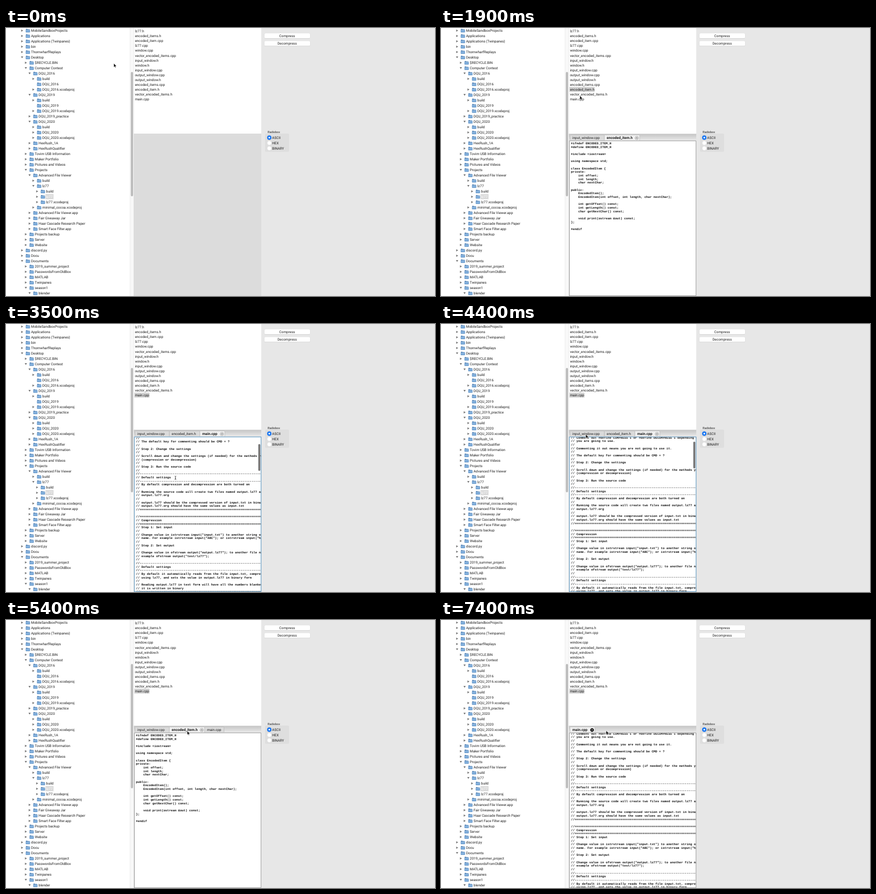
Write an HTML page that moves like this. It is 800 px wide and 500 px high and loops after 7500 ms.

```html
<!DOCTYPE html>
<html lang="en">
<head>
<meta charset="utf-8">
<title>File viewer</title>
<style>
  html, body { margin: 0; width: 100%; height: 100%; overflow: hidden; background: #e7e7e7; }
  svg { display: block; }
  text { font: 6.45px Roboto, sans-serif; fill: #1c1c1c; white-space: pre; text-rendering: geometricPrecision; }
  .code text { font: bold 5.715px "Liberation Mono", "Noto Sans CJK KR", monospace; fill: #111; }
  .code tspan { font-size: 5.3px; }
</style>
</head>
<body>
<svg id="stage" width="800" height="500" viewBox="0 0 800 500">
  <defs>
    <linearGradient id="bar" x2="0" y2="1">
      <stop stop-color="#c6c6c6"/><stop offset="1" stop-color="#ededed"/>
    </linearGradient>
    <linearGradient id="fold" x2="0" y2="1">
      <stop stop-color="#9cc3e8"/><stop offset="1" stop-color="#6a9ed2"/>
    </linearGradient>
    <clipPath id="view"><rect x="240" y="211.2" width="235.3" height="287.6"/></clipPath>
    <g id="folder">
      <path d="M.4-2.9h2.7l.8.8h3.5v5H.4z" fill="#5b88b8"/>
      <path d="M.3-1.2h7.5v3.9q0 .5-.5.5H.8q-.5 0-.5-.5z" fill="url(#fold)" stroke="#5585b8" stroke-width=".5"/>
    </g>
  </defs>
  <rect width="238" height="500" fill="#fff"/>
  <g id="tree"></g>
  <rect x="231" width="7" height="500" fill="#f8f8f8"/>
  <path d="M231.2 0V500" stroke="#e6e6e6" stroke-width=".6"/>
  <rect x="232.8" y="82" width="4.2" height="232" rx="2.1" fill="#bcbcbc"/>
  <rect x="238" width="238" height="500" fill="#dcdcdc"/>
  <rect x="238.5" width="237.5" height="197" fill="#fff"/>
  <rect id="picked" x="239.5" height="9.2" fill="#d2d2d2"/>
  <g id="files"></g>
  <g id="panel"></g>
  <g id="editor">
    <rect x="238.5" y="198" width="237.5" height="13" fill="url(#bar)"/>
    <g id="tabs"></g>
    <rect x="238.5" y="209.4" width="237.5" height="1.6" fill="#e2e2e2"/>
    <rect id="frame" x="239.4" y="210.7" width="236.2" height="288.6" fill="#fff"/>
    <g id="docs" clip-path="url(#view)"></g>
    <rect id="thumb" x="470.5" width="3.7" rx="1.8" fill="#747474"/>
  </g>
  <path id="arrow" d="M0 0V7.2L1.7 5.7 2.8 8.2 3.9 7.7 2.8 5.3H5.1z" fill="#000" stroke="#fff" stroke-width=".5"/>
  <path id="beam" d="M-1.5-3.2Q0-3.2 0-2.4Q0-3.2 1.5-3.2M0-2.4V2.4M-1.5 3.2Q0 3.2 0 2.4Q0 3.2 1.5 3.2M-.8 .8H.8" fill="none" stroke="#111" stroke-width=".7"/>
</svg>
<script>
const LOOP = 7500, STEP = 100, LINE = 6.667;
const el = id => document.getElementById(id);
const esc = s => s.replace(/&/g, '&amp;').replace(/</g, '&lt;');
const label = (x, y, s, extra = '') => `<text x="${x}" y="${y + 2.3}" ${extra}>${esc(s)}</text>`;
const show = (id, on) => el(id).setAttribute('display', on ? 'inline' : 'none');
const set = (id, attrs) => { for (const k in attrs) el(id).setAttribute(k, attrs[k]); };

// Depth, state (> closed, v open, - leaf), name
const tree = `0>MobileSandboxProjects
0>Applications
0>Applications (Twinpanes)
0>bin
0>ThornwharfReplays
0vDesktop
1>$RECYCLE.BIN
1vComputer Contest
2vDQU_2016
3>build
3-DQU_2016
3>DQU_2016.xcodeproj
2vDQU_2019
3>build
3-DQU_2019
3>DQU_2019.xcodeproj
2>DQU_2019_practice
2vDQU_2020
3>build
3>DQU_2020
3>DQU_2020.xcodeproj
2>HexRush_1A
2>HexRushQualifier
1>Tovim USB Information
1>Maker Portfolio
1>Pictures and Videos
1vProjects
2vAdvanced File Viewer
3>build
3vlz77
4>build
4>lz77
4>lz77.xcodeproj
3>minimal_cocoa.xcodeproj
2>Advanced File Viewer.app
2>Fair Giveaway Jar
2>Haar Cascade Research Paper
2>Smart Face Filter.app
1>Projects backup
1>Server
1>Website
0>discord.py
0>Docu
0vDocuments
1>2019_summer_project
1>PasswordsFromOldBox
1>MATLAB
1>Twinpanes
1vseason1
2vblender`.split('\n');

const files = `lz77.h encoded_items.h encoded_item.cpp lz77.cpp window.cpp vector_encoded_items.cpp
input_window.h window.h input_window.cpp output_window.cpp output_window.h encoded_items.cpp
encoded_item.h vector_encoded_items.h main.cpp`.split(/\s+/);

const slashes = '/'.repeat(2);

// Each line gets its slashes; = and - become rules, ~ a blank line
const remarks = text => text.split('\n').map(s =>
  s === '~' ? '' : /^[=-]$/.test(s) ? slashes + s.repeat(80) : slashes + ' ' + s).join('\n');

const docs = {
  input: { name: 'input_window.cpp', width: 64, active: 73, row: 8, pick: 52, thumb: 65.5, rate: .23, text:
`${slashes}#define DEBUG_MSG 1

#include <iostream>
#include <fstream>

using namespace std;

#include "input_window.h"

InputWindow::InputWindow(istream &in, int fileSize) : in(in) {
    this->fileSize = fileSize;
    fileNumCharsProcessed = 0;
    fileNumCharsRemained = fileSize;
    init(WINDOW_SIZE);
}

InputWindow::InputWindow(istream &in, int fileSize, int windowSize) : in(in) {
    this->fileSize = fileSize;
    fileNumCharsProcessed = 0;
    fileNumCharsRemained = fileSize;
    init(windowSize);
}

std::ifstream::pos_type InputWindow::getFileSize(const char* filename) {
    std::ifstream in(filename, std::ifstream::ate | std::ifstream::binary);
    return in.tellg();
}

void InputWindow::init(int windowSize) {
    this->windowSize = windowSize;
    buffSize = windowSize * 2 + 1;

    buff = new char[buffSize];
    head = 0;
    pointer = 0;
    tail = 0; ${slashes} char를 in으로부터 한개 빼서 넣을 자리.

    numChars = 0; ${slashes} numCharsProcessed + numCharsRemained
    numCharsProcessed = 0;
    numCharsRemained = 0;

    while (numChars < windowSize && appendNextChar()) {
        numChars++;
        numCharsRemained++;
    }
${slashes}    cout << "Window::Window(): numChars = " << numChars << endl;
${slashes}
}

InputWindow::~InputWindow() {
    delete[] buff;
}` },
  item: { name: 'encoded_item.h', width: 57, active: 66, row: 12, pick: 47, thumb: 0, rate: 0, text:
`#ifndef ENCODED_ITEM_H
#define ENCODED_ITEM_H

#include <iostream>

using namespace std;

class EncodedItem {
private:
    int offset;
    int length;
    char nextChar;

public:
    EncodedItem();
    EncodedItem(int offset, int length, char nextChar);

    int getOffset() const;
    int getLength() const;
    char getNextChar() const;

    void print(ostream &out) const;
};

#endif` },
  main: { name: 'main.cpp', width: 36, active: 46.5, row: 14, pick: 28, thumb: 50, rate: .176, text: remarks(
`=
How to use

Step 1: Choose setting

Comment out #define COMPRESS 1 or #define DECOMPRESS 1 depending on what
you are going to use.

Commenting it out means you are not going to use it.

The default key for commenting should be CMD + ?

Step 2: Change the settings

Scroll down and change the settings (if needed) for the methods you use
(compression or decompression)

Step 3: Run the source code

-
Default settings
-
By default compression and decompression are both turned on

Running the source code will create two files named output.lz77 and
output.lz77.org

output.lz77 should be the compressed version of input.txt in binary
output.lz77.org should have the same values as input.txt
=
~
=
Compression
=
Step 1: Set input

Change value in istrstream input("input.txt") to another string or
name. For example istrstream input("ABC"); or istrstream input("hi");

Step 2: Set output

Change value in ofstream output("output.lz77"); to another file name
example ofstream output("test/lz77");

-
Default settings
-
By default it automatically reads from the file input.txt, compresses
using lz77, and sets the value in output.lz77 in binary form

Reading output.lz77 in text form will have all the numbers blanked as
it is written in binary
=
~
=
Decompression`) }
};

// Start time, open tabs, active tab
const sessions = [
  [700, 'input', 'input'],
  [1500, 'input item', 'item'],
  [2300, 'input item main', 'main'],
  [4500, 'input item main', 'input'],
  [5400, 'input item main', 'item'],
  [6100, 'input main', 'main'],
  [6800, 'input main', 'input'],
  [7400, 'main', 'main']
];
const picks = [[600, 'input'], [1400, 'item'], [2200, 'main']];
const pointer = [
  [0, 201, 66], [300, 264, 78], [800, 264, 78], [1300, 262, 111], [1600, 262, 111],
  [2000, 258, 131.5], [2400, 258, 131.5], [2700, 316, 287], [4100, 316, 287], [4400, 270, 206],
  [4500, 270, 206], [4700, 303, 272], [5100, 303, 272], [5400, 338, 207], [5600, 338, 207],
  [5900, 364, 207.5], [6200, 364, 207.5], [6600, 270, 207], [6900, 270, 207], [7300, 308, 206.5]
];
const scrolls = {
  input: [[4700, 0], [4800, 26.67], [5000, 40]],
  item: [[0, 0]],
  main: [[2900, 0], [3200, 30], [3300, 30], [3500, 62.5], [3700, 75], [4000, 36.7]]
};

const latest = (list, t) => list.filter(e => e[0] <= t).pop();
const within = (t, ...spans) => spans.some(([a, b]) => t >= a && t < b);

function track(keys, t) {
  const next = keys.findIndex(k => k[0] > t);
  if (next < 0) return keys[keys.length - 1].slice(1);
  if (next === 0) return keys[0].slice(1);
  const a = keys[next - 1], b = keys[next], p = (t - a[0]) / (b[0] - a[0]);
  return a.slice(1).map((v, i) => v + (b[i + 1] - v) * p);
}

function closeMark(x, hot) {
  return `<g transform="translate(${x} 205.2)" stroke-width=".8" stroke="${hot ? '#fff' : '#555'}">
    <circle r="3" fill="${hot ? '#000' : '#f2f2f2'}" stroke="${hot ? '#000' : '#777'}" stroke-width=".6"/>
    <path d="M-1.3-1.3L1.3 1.3M1.3-1.3L-1.3 1.3"/></g>`;
}

function tabStrip(open, active, hot) {
  let x = 240.5;
  return open.split(' ').map(id => {
    const d = docs[id], on = id === active, w = on ? d.active : d.width;
    const svg = `<path d="M${x} 210V200.5q0-1 1-1h${w - 2}q1 0 1 1V210" fill="${on ? '#efefef' : '#dadada'}" stroke="#adadad" stroke-width=".6"/>`
      + label(x + 4.5, 205, d.name, `style="font-size:${on ? '6.75px;font-weight:700' : '6.38px'}"`)
      + (on ? closeMark(x + w - 5.3, hot) : '');
    x += w;
    return svg;
  }).join('');
}

function build() {
  el('tree').innerHTML = tree.map((row, i) => {
    const x = 30 + 7 * row[0], y = 5 + 10 * i, name = row.slice(2), picked = i === 31;
    const mark = { '>': 'M-1.6-2.1L2 0-1.6 2.1z', v: 'M-2.1-1.7H2.1L0 1.8z', '-': '' }[row[1]];
    return `<path d="${mark}" transform="translate(${x} ${y - .2})" fill="#777"/>
      <use href="#folder" x="${x + 6.7}" y="${y - .3}"/>`
      + (picked ? `<rect x="${x + 15.6}" y="${y - 5}" width="15" height="9.5" fill="#dadada"/>` : '')
      + label(x + 16.8, y, name, picked ? 'style="fill:#fff"' : '');
  }).join('');

  el('files').innerHTML = files.map((f, i) => label(240.4, 6 + 9.04 * i, f)).join('');

  const button = (y, s) => `<rect x="481.7" y="${y - 4.4}" width="85.6" height="9.6" rx="2" fill="#cfcfcf"/>
    <rect x="482" y="${y - 4.5}" width="85" height="9.1" rx="1.9" fill="#fff"/>`
    + label(524.2, y, s, 'text-anchor="middle"');
  const radio = (y, s, on) => `<circle cx="491" cy="${y}" r="3.9" fill="${on ? '#1978f5' : '#fff'}" stroke="${on ? '#1469dc' : '#d0d0d0'}" stroke-width=".4"/>`
    + (on ? `<circle cx="491" cy="${y}" r="1.5" fill="#fff"/>` : '') + label(496.2, y, s);
  el('panel').innerHTML = button(14.5, 'Compress') + button(28.7, 'Decompress')
    + label(488, 193.7, 'Radiobox', 'style="font-size:5.5px"')
    + '<rect x="483" y="197" width="45" height="34" rx="2" fill="#dedede"/>'
    + radio(204.5, 'ASCII', true) + radio(214.5, 'HEX') + radio(224.5, 'BINARY');

  el('docs').innerHTML = Object.entries(docs).map(([id, d]) => `<g id="doc-${id}" class="code">`
    + d.text.split('\n').map((s, i) => `<text x="242.3" y="${217.1 + LINE * i}">`
      + esc(s).replace(/[가-힣]+/g, '<tspan>$&</tspan>') + '</text>').join('') + '</g>').join('');
}

function draw(t) {
  const pick = latest(picks, t), session = latest(sessions, t);
  show('picked', pick);
  if (pick) {
    const d = docs[pick[1]];
    set('picked', { y: 1.5 + 9.04 * d.row, width: d.pick });
  }

  show('editor', session);
  if (session) {
    const [, open, active] = session, d = docs[active];
    const [offset] = track(scrolls[active], t);
    const focused = within(t, [2900, 4500]);
    el('tabs').innerHTML = tabStrip(open, active, within(t, [5900, 6300], [7300, LOOP]));
    set('frame', { stroke: focused ? '#6fa3c8' : '#8c8c8c', 'stroke-width': focused ? 1.2 : .8 });
    for (const id in docs) show('doc-' + id, id === active);
    set('doc-' + active, { transform: `translate(0 ${-offset})` });
    show('thumb', d.thumb && within(t, [700, 1500], [2300, 5400]));
    set('thumb', { y: 213 + offset * d.rate, height: d.thumb });
  }

  const [x, y] = track(pointer, t), typing = y > 212;
  show('arrow', !typing);
  show('beam', typing);
  set(typing ? 'beam' : 'arrow', { transform: `translate(${x} ${y})` });
}

build();
const start = performance.now();
let shown = -1;
function tick() {
  const t = Math.floor((performance.now() - start) % LOOP / STEP) * STEP;
  if (t !== shown) draw(shown = t);
  requestAnimationFrame(tick);
}
tick();
</script>
</body>
</html>
```
